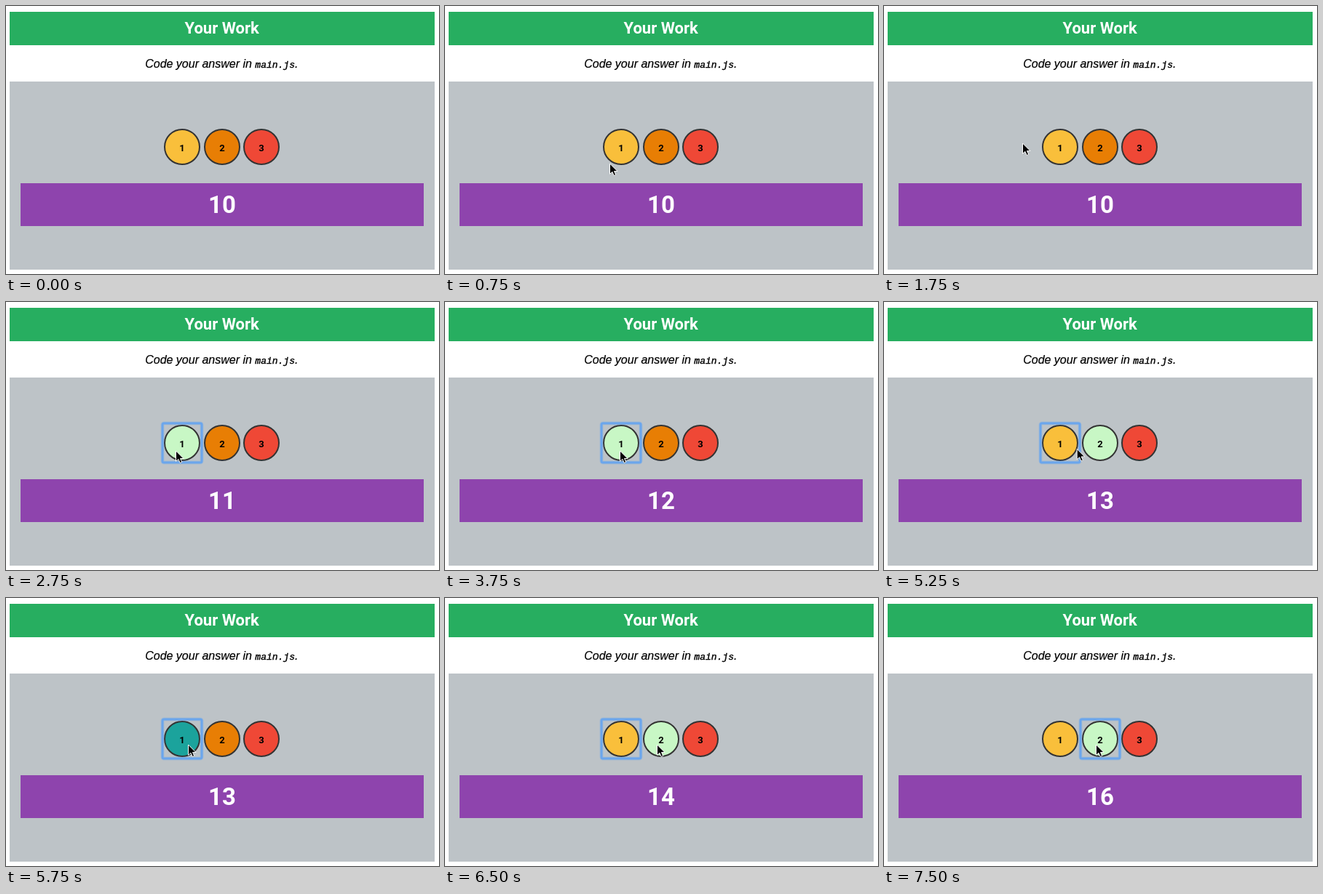
Write an HTML page that moves like this. It is 595 px wide and 369 px high and loops after 8000 ms.

```html
<!DOCTYPE html>
<html lang="en">
<head>
<meta charset="utf-8">
<title>Your Work</title>
<style>
  html, body { margin: 0; width: 100%; height: 100%; overflow: hidden; background: #fff; }
  svg { display: block; width: 595px; height: 369px; }
  text { text-anchor: middle; }
  .bold { font-family: Roboto, "Liberation Sans", sans-serif; font-weight: 700; }
  .hint { font: italic 16px "Liberation Sans", Arial, sans-serif; stroke: #000; stroke-width: .2; }
  .code { font: italic 13px "Liberation Mono", monospace; stroke-width: .4; }
  .button circle { stroke: #333; stroke-width: 2; }
  .button text { font-size: 13px; }
  #ring { fill: none; stroke: #6ba6ec; }
</style>
</head>
<body>
<svg viewBox="0 0 595 369">
  <rect x="5" y="8" width="584" height="46" fill="#27ae60"/>
  <text class="bold" x="296.7" y="38" font-size="22" fill="#fff">Your Work</text>
  <text class="hint" x="296.3" y="85" xml:space="preserve">Code your answer in <tspan class="code">main.js</tspan>.</text>
  <rect x="5" y="104" width="584" height="259" fill="#bdc3c7"/>
  <rect x="20" y="244" width="554" height="59" fill="#8e44ad"/>
  <text id="total" class="bold" x="297" y="285" font-size="33" fill="#fff"></text>
  <g id="buttons"></g>
  <g id="ring">
    <rect x="-27" y="167" width="54" height="54" rx="2" stroke-width="5" opacity=".3"/>
    <rect x="-27" y="167" width="54" height="54" rx="2" stroke-width="3"/>
  </g>
  <g id="cursor">
    <path d="M2 2V16.2L5.2 13.2 7.4 18.2 9.8 17.2 7.7 12.4H12Z" opacity=".15"/>
    <path d="M1.5 1V15.4L4.9 12.3 7.2 17.5 9.7 16.4 7.5 11.5H12Z" stroke="#fff"/>
  </g>
</svg>
<script>
const DURATION = 8000, STEP = 250, HOLD = 150, START_TOTAL = 10;
const HOVER = '#c8f7c5', PRESSED = '#1ba39c';
const BUTTONS = [
  { x: 242, value: 1, color: '#f9bf3b' },
  { x: 297, value: 2, color: '#e87e04' },
  { x: 351, value: 3, color: '#ef4836' }
];

// The pointer jumps to `from`, then glides to `to` if there is one.
const STROKES = [
  { at: 250, from: [222, 8] },
  { at: 500, from: [207, 186] },
  { at: 750, from: [225, 216], to: [171, 177], glide: 500 },
  { at: 1250, from: [171, 177], to: [189, 188], glide: 500 },
  { at: 2250, from: [232, 204] },
  { at: 3500, from: [239, 204] },
  { at: 5000, from: [282, 202], to: [249, 201], glide: 750 },
  { at: 6000, from: [273, 201], to: [290, 201], glide: 500 }
];
const HOVERS = [
  { at: 2250, button: 0 }, { at: 5000, button: 1 },
  { at: 5500, button: 0 }, { at: 6000, button: 1 }
];
const latest = (events, t) => events.filter(event => event.at <= t).pop();
const hoveredAt = t => latest(HOVERS, t)?.button;
const CLICKS = [2600, 3500, 4500, 5750, 7000].map(at => ({ at, button: hoveredAt(at) }));

const easeOut = p => 1 - (1 - p) ** 2;

function pointerAt(t) {
  const stroke = latest(STROKES, t);
  if (!stroke) return null;
  const { at, from, to = from, glide = 1 } = stroke;
  const p = easeOut(Math.min((t - at) / glide, 1));
  return from.map((start, axis) => start + (to[axis] - start) * p);
}

const byId = id => document.getElementById(id);

function place(node, position) {
  node.setAttribute('visibility', position ? 'visible' : 'hidden');
  if (position) node.setAttribute('transform', `translate(${position})`);
}

byId('buttons').innerHTML = BUTTONS.map(({ x, value }) =>
  `<g class="button"><circle cx="${x}" cy="194" r="24"/>
   <text class="bold" x="${x}" y="200">${value}</text></g>`).join('');
const circles = document.querySelectorAll('.button circle');

function draw(t) {
  const hovered = hoveredAt(t);
  const click = latest(CLICKS, t);
  const active = click && t < click.at + HOLD ? PRESSED : HOVER;
  const total = CLICKS.filter(({ at }) => at + HOLD <= t)
    .reduce((sum, { button }) => sum + BUTTONS[button].value, START_TOTAL);

  circles.forEach((circle, i) =>
    circle.setAttribute('fill', i === hovered ? active : BUTTONS[i].color));
  place(byId('cursor'), pointerAt(t));
  place(byId('ring'), click && [BUTTONS[click.button].x, 0]);
  byId('total').textContent = total;
}

const start = performance.now();
function tick() {
  const t = (performance.now() - start) % DURATION;
  draw(Math.floor(t / STEP) * STEP);
  requestAnimationFrame(tick);
}
tick();
</script>
</body>
</html>
```
